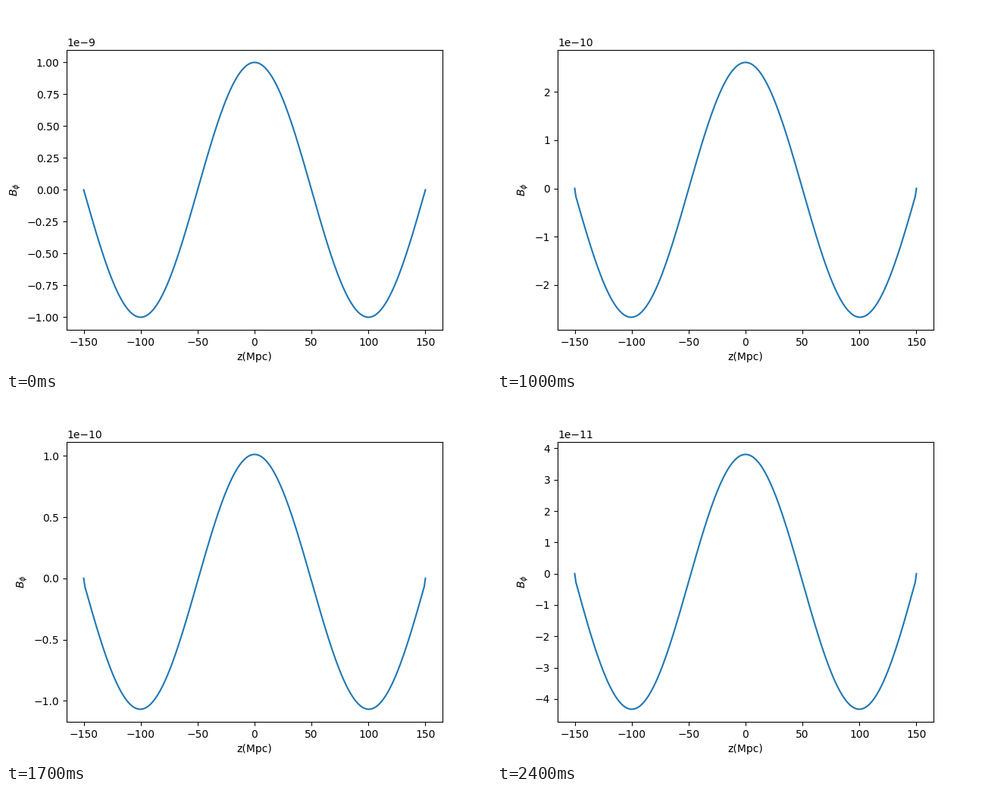
Recreate the animation shown at these times as a matplotlib script. Size 640 by 480 pixels, loop 2500 ms.

```python
import numpy as np
import matplotlib.pyplot as plt
from matplotlib.animation import FuncAnimation

FRAMES = 25
INTERVAL = 100
B0 = 1e-9       # initial field amplitude
RATE = 0.1324   # decay of the main mode per frame

# Diffusing field, with the zero boundary one cell beyond the grid
z = np.linspace(-150, 150, 301)
half = 150 + (z[1] - z[0])
start = np.cos(np.pi * z / 100)
orders = np.arange(1, 300, 2)
modes = np.cos(np.pi * np.outer(orders, z) / (2 * half))
weights = modes @ start * (z[1] - z[0]) / half


def field(step):
    if step == 0:
        b = start.copy()
    else:
        b = (weights * np.exp(-RATE * (orders / 3) ** 2 * step)) @ modes
    b[[0, -1]] = 0
    return B0 * b


fig, ax = plt.subplots(figsize=(6.4, 4.8), dpi=100)
line, = ax.plot(z, field(0))
ax.set_xlabel("z(Mpc)")
ax.set_ylabel(r"$B_{\phi}$")


def update(step):
    line.set_ydata(field(step))
    ax.relim()
    ax.autoscale_view()
    return line,


anim = FuncAnimation(fig, update, frames=FRAMES, interval=INTERVAL,
                     repeat=True, repeat_delay=0, blit=False)
plt.show()
```
